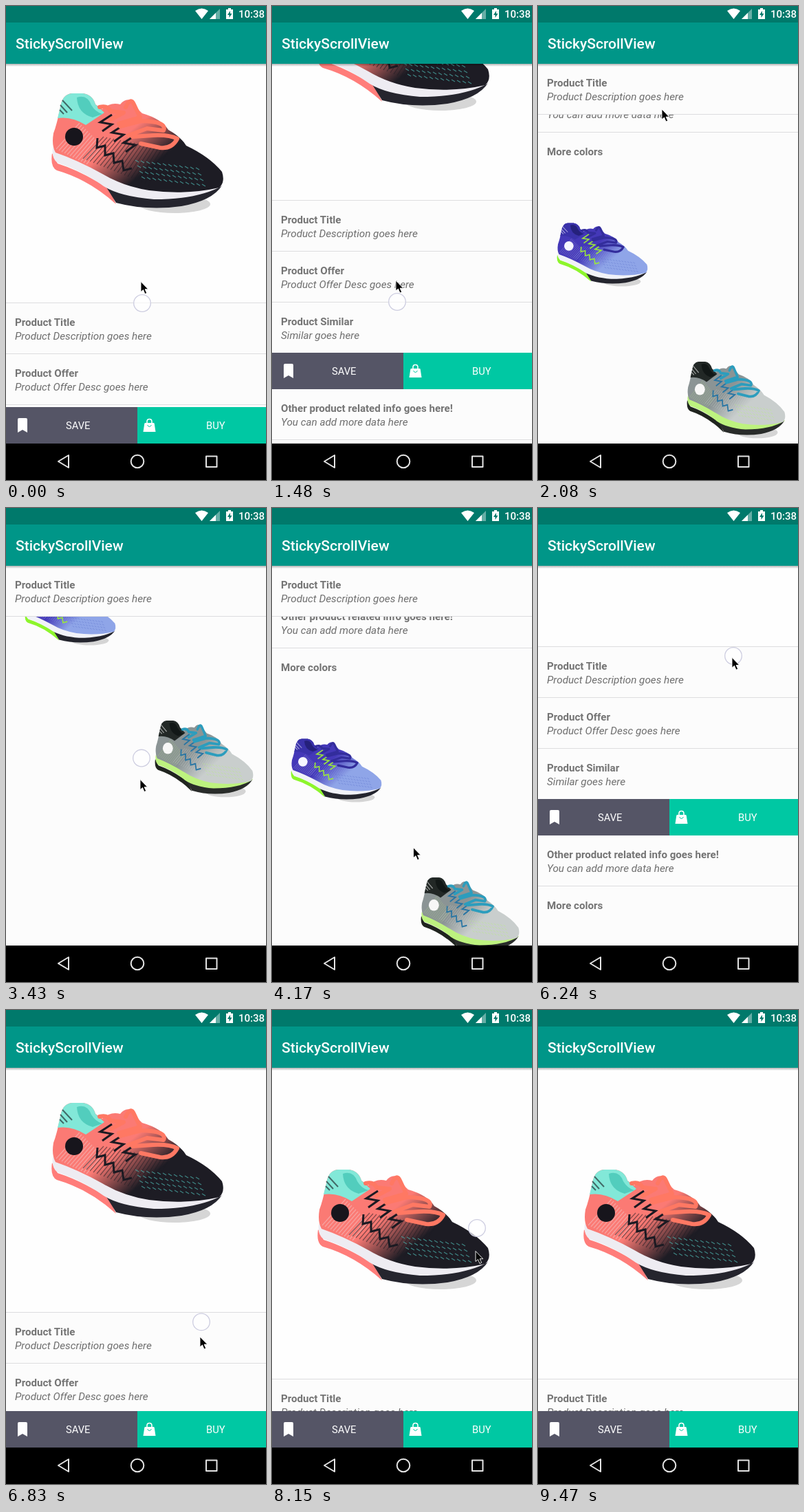
Animation, 378 px wide and 689 px high, one loop 9630 ms. Source, as an HTML page:

```html
<!DOCTYPE html>
<html lang="en">
<head>
<meta charset="utf-8">
<title>StickyScrollView</title>
<style>
  html, body { margin: 0; height: 100%; overflow: hidden; background: #fcfcfc; }
  svg { display: block; width: 100vw; height: 100vh; font: 14.7px Roboto, sans-serif; }
  .line { fill: #dddddf; }
  .name { font-size: 15.1px; font-weight: 700; fill: #747474; }
  .desc { font-size: 15.25px; font-style: italic; fill: #6e6e6e; }
  .nav { fill: none; stroke: #e4e4e4; stroke-width: 2; stroke-linejoin: round; }
</style>
</head>
<body>
<svg viewBox="0 0 378 689">
  <defs>
    <linearGradient id="drop" x2="0" y2="1">
      <stop stop-color="#000" stop-opacity=".3"/>
      <stop offset="1" stop-color="#000" stop-opacity="0"/>
    </linearGradient>
    <clipPath id="aboveBar"><rect width="378" height="583"/></clipPath>
  </defs>
  <rect width="378" height="689" fill="#fcfcfc"/>
  <g id="page"></g>
  <g id="bar">
    <rect width="191" height="53" fill="#555566"/>
    <rect x="191" width="187" height="53" fill="#00c8a3"/>
    <g fill="#fff">
      <path d="M17 18q0-2 2-2h10q2 0 2 2v19l-7-4-7 4z"/>
      <text x="87" y="32">SAVE</text>
      <path d="M202.500 23h12q1 0 1.200 1l1.800 12h-18l1.800-12q.2-1 1.200-1z"/>
      <text x="291" y="32">BUY</text>
    </g>
    <path d="M205 24v-3q0-3.500 3.500-3.500t3.500 3.500v3" fill="none" stroke="#fff" stroke-width="1.600"/>
    <path d="M205.500 26q3 5 6 0" fill="none" stroke="#00c8a3"/>
  </g>
  <g clip-path="url(#aboveBar)"><g id="head"></g></g>

  <rect y="84" width="378" height="4" fill="url(#drop)"/>
  <rect width="378" height="24" fill="#00796b"/>
  <rect y="24" width="378" height="60" fill="#009688"/>
  <text x="14" y="62" font-size="21" font-weight="500" fill="#fff">StickyScrollView</text>
  <g fill="#fff">
    <path d="M275 7q9.500-7 19 0l-9.500 12z"/>
    <path d="M311 4v15h-15z" opacity=".4"/>
    <path d="M305 10v9h-9z"/>
    <path d="M320 5h3V3h4v2h3v14h-10z"/>
    <path d="M326 7l-4 6h2.500v4l4-6h-2.500z" fill="#00796b"/>
    <text x="338" y="17" font-size="15" font-weight="500">10:38</text>
  </g>

  <rect y="636" width="378" height="53"/>
  <g class="nav">
    <path d="M76 662l15-9v18z"/>
    <circle cx="191" cy="662" r="9.300"/>
    <rect x="291" y="654.500" width="15.500" height="15.500"/>
  </g>

  <circle id="touch" r="12.300" fill="#fff" fill-opacity=".65" stroke="#cdcde0" stroke-width="1.300"/>
  <path id="cursor" d="M0 0v15l3.500-3 2.500 6 2.700-1.200-2.600-5.600h4.700z" stroke="#fff" stroke-width=".9"/>
</svg>
<script>
const LOOP = 9630, STEP = 148.15;
const HEAD_TOP = 83, BAR_TOP = 583, START = 431, SCROLL_MAX = 536;
const $ = id => document.getElementById(id);

const section = (y, name, desc = '', line = true) =>
  (line ? `<rect class="line" y="${y}" width="378" height="1"/>` : '') +
  `<text class="name" x="13" y="${y + 33.5}">${name}</text>
   <text class="desc" x="13" y="${y + 54}">${desc}</text>`;

const repeat = (n, draw) => Array.from({ length: n }, (_, i) => draw(i)).join('');

// One trainer, drawn at full size and recoloured for each product.
function shoe(id, c, place) {
  const pale = repeat(12, i => `M${73 + i * 4} ${208 + i * 2}l${34 - i} ${-38 + i}`);
  const stripes = repeat(20, i => `M${112 + i * 5} ${222 + i * 2}L${142 + i * 5} ${190 + i}`);
  const dashes = repeat(48, i => {
    const row = i % 4, col = i / 4 | 0;
    return `M${188 + col * 8 + row * 3} ${224 + row * 8 + col}l5 3`;
  });
  const loops = repeat(3, i => `M${154 + i * 17} ${158 + i * 15}l-17 11 17 3-14 10`) +
    'M133 192' + repeat(4, i => `l${-1 + i} 14 12-3`);
  return `<g transform="${place}">
    <linearGradient id="${id}" gradientUnits="userSpaceOnUse" x1="150" y1="185" x2="204" y2="250">
      <stop offset=".2" stop-color="${c.body}"/><stop offset=".9" stop-color="${c.toe}"/>
    </linearGradient>
    <ellipse cx="245" cy="288" rx="52" ry="13" fill="#ccc" opacity=".8"/>
    <path fill="${c.under}" d="M67 214Q64 234 74 239 120 252 160 288L150 266Q110 240 75 229Z"/>
    <path fill="${c.out}" d="M145 262L160 286Q205 298 255 291 300 283 314 261L215 278Z"/>
    <path fill="${c.sole}" d="M68 206Q66 222 75 228 112 240 142 262 166 277 215 281 280 281 315 261L306 254 160 240Z"/>
    <path fill="url(#${id})" d="M79 147Q82 128 96 127L112 127Q126 129 130 143L140 150Q152 139 166 143 174 133 184 138 189 148 198 156 226 164 236 180 254 190 262 203 296 219 314 241 319 256 310 264 262 275 208 268 170 262 140 244 104 224 72 213 66 203 69 185 74 172 79 147Z"/>
    <path fill="${c.heel}" d="M79 147Q82 128 96 127L112 127Q126 129 130 143L143 155 116 173Q96 160 75 163Z"/>
    <path fill="${c.lining}" d="M103 133Q118 128 124 144 130 154 140 157L126 162Q104 156 103 133Z"/>
    <path d="${pale}" stroke="${c.sole}" stroke-width="1.200" opacity=".35"/>
    <path d="${stripes}" stroke="${c.toe}" stroke-width="1.300" opacity=".5"/>
    <path d="${dashes}" stroke="${c.mesh}" stroke-width="1.200" opacity=".75"/>
    <path d="M82 137l14 15M79 144l10 11M78 151l6 6" stroke="${c.mark}" stroke-width="2" opacity=".6"/>
    <circle cx="99" cy="190" r="13" fill="${c.mark}"/>
    <path fill="none" stroke="${c.loop}" stroke-width="3" d="${loops}"/>
    <path fill="none" stroke="${c.lace}" stroke-width="6" stroke-linecap="round" stroke-linejoin="round"
      d="M136 147Q148 144 152 153L171 155 152 165M174 147Q181 132 186 143L195 162 164 171M166 175L197 167Q235 168 229 181L205 178 178 188M184 190L214 188Q238 187 249 193 241 208 224 206L196 200"/>
  </g>`;
}

const coral = { body: '#fb7a74', toe: '#1d1c24', heel: '#82e8d8', lining: '#52cdbd', sole: '#eeecf2',
  out: '#25252e', under: '#ff7d7a', lace: '#ff7863', loop: '#1c1a22', mesh: '#4aa9a5', mark: '#17151c' };
const blue = { body: '#4438b8', toe: '#8fa5e8', heel: '#3a32aa', lining: '#25217c', sole: '#f1f2f8',
  out: '#24252e', under: '#8df52c', lace: '#332d9c', loop: '#9be83a', mesh: '#6076ce', mark: '#f6f6ff' };
const lime = { body: '#8b9495', toe: '#c9cecd', heel: '#222826', lining: '#121817', sole: '#bdf27f',
  out: '#292c2a', under: '#20241f', lace: '#2c9dbd', loop: '#2775a4', mesh: '#b9ec86', mark: '#f7f7f7' };

// Page coordinates start at the line above the product title.
$('page').innerHTML =
  '<rect y="-453" width="378" height="453" fill="#fefefe"/>' +
  shoe('coral', coral, 'translate(0 -431)') +
  section(74, 'Product Offer', 'Product Offer Desc goes here') +
  section(148, 'Product Similar', 'Similar goes here') +
  section(274, 'Other product related info goes here!', 'You can add more data here', false) +
  section(348, 'More colors') +
  shoe('blue', blue, 'translate(-7.400 413.500) scale(.528)') +
  shoe('lime', lime, 'translate(178.700 600.700) scale(.572 .64)');

$('head').innerHTML = '<rect width="378" height="74" fill="#fcfcfc"/>' +
  section(0, 'Product Title', 'Product Description goes here') +
  '<rect class="line" y="74" width="378" height="1"/>';

const fling = f => 1 - (1 - f) ** 1.3;
const smooth = f => f * f * (3 - 2 * f);
const clamp = (v, lo, hi) => Math.max(lo, Math.min(hi, v));

// Swipes: steps, scroll distance, finger start, and how far the mouse runs ahead of the touch dot.
const swipes = [
  { start: 0, end: 3, dist: -149, x: 198, y: 432, lead: 0.5, ease: fling },
  { start: 10, end: 17, dist: -670, x: 182, y: 430, lead: 0.25, ease: fling },
  { start: 22.3, end: 27, dist: 243, x: 197, y: 349, lead: 0.6, ease: smooth },
  { start: 31, end: 38, dist: 346, x: 260, y: 162, lead: 0.6, ease: smooth },
  { start: 42, end: 48.2, dist: 335, x: 284, y: 215, lead: 0.3, ease: smooth },
  { start: 52, end: 58, dist: 110, x: 298, y: 262, lead: 1.3, ease: smooth },
];
const exit = { start: 64, x: 340, y: 700 };

const moved = (s, step) => s.dist * s.ease(clamp((step - s.start) / (s.end - s.start), 0, 1));
const scrollAt = step =>
  Math.round(Math.min(SCROLL_MAX, swipes.reduce((sum, s) => sum + moved(s, step), START)));

// Follow the current swipe, then glide to where the next one begins.
function pointerAt(step, i) {
  const s = swipes[i], next = swipes[i + 1] || exit, free = s.start + 5;
  const y = clamp(s.y + moved(s, Math.min(step, free) + s.lead), 150, 560);
  const f = smooth(clamp((step - free) / (next.start - 1 - free), 0, 1));
  return [s.x - 2 + (next.x - s.x) * f, y + (next.y - y) * f];
}

const move = (id, x, y) => $(id).setAttribute('transform', `translate(${x} ${y})`);

function draw() {
  const step = Math.min(64, Math.floor((performance.now() % LOOP + 25) / STEP));
  const top = scrollAt(step);
  move('page', 0, top);
  move('head', 0, Math.max(HEAD_TOP, top));
  move('bar', 0, Math.min(BAR_TOP, top + 222));

  const i = swipes.findLastIndex(s => step >= s.start - 1), s = swipes[i];
  move('cursor', ...pointerAt(step, i));
  move('touch', s.x, s.y + moved(s, step));
  $('touch').style.display = step <= Math.min(s.end - 1, s.start + 4) ? '' : 'none';
  requestAnimationFrame(draw);
}
draw();
</script>
</body>
</html>
```
